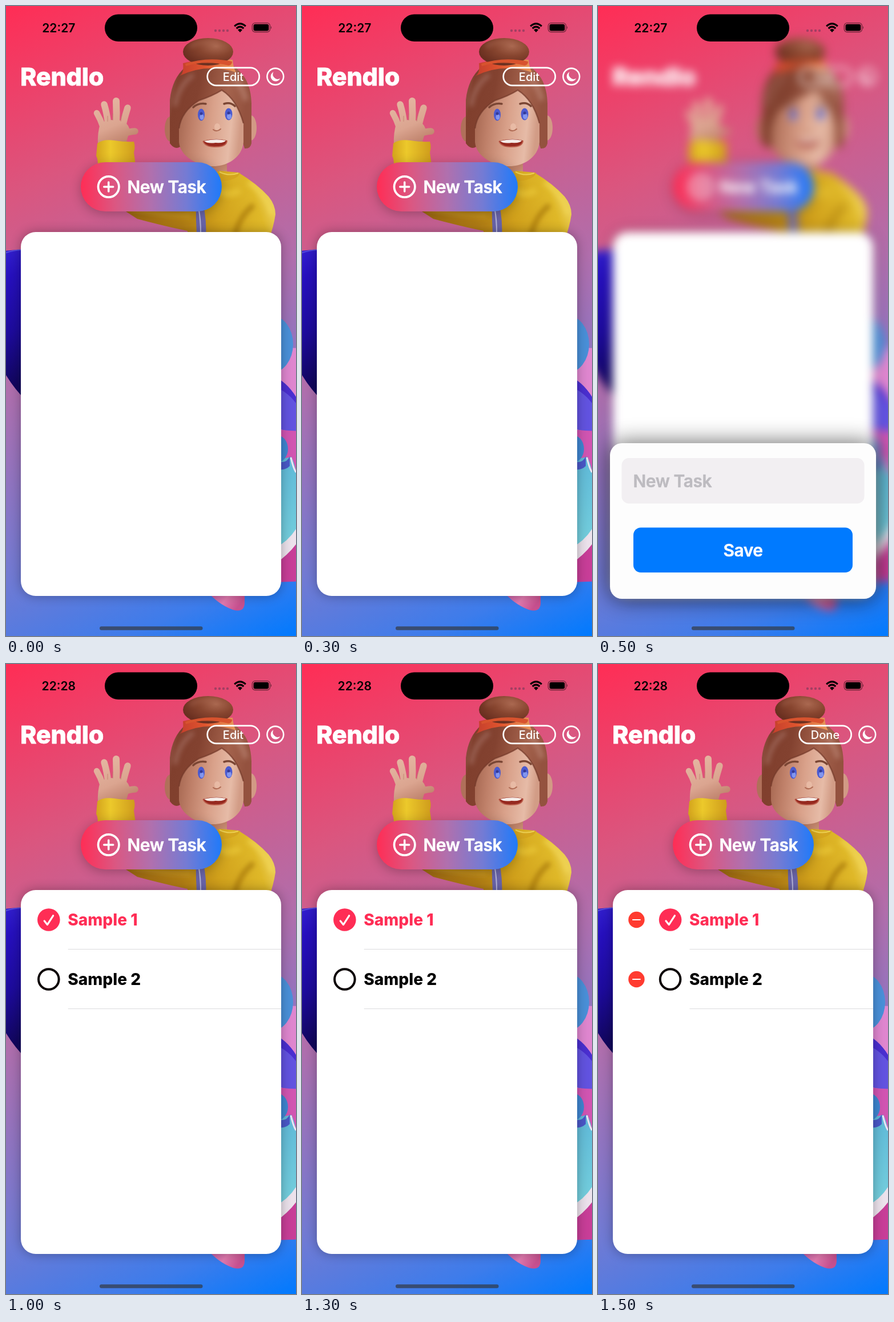
Write an HTML page that moves like this. It is 508 by 1101 pixels and loops after 2000 ms.

```html
<!DOCTYPE html>
<html lang="en">
<head>
<meta charset="utf-8">
<title>Task list</title>
<style>
html, body { margin: 0; width: 100%; height: 100%; overflow: hidden; background: #b06eac; }
svg { display: block; width: 100%; height: 100%; }
text { font-family: Inter, "Open Sans", sans-serif; font-weight: 600; stroke-linejoin: round; }
.white { fill: #fff; }
.line { fill: none; stroke: #fff; stroke-linecap: round; stroke-linejoin: round; }
.big { font-size: 30px; letter-spacing: -.45px; stroke-width: .5; }
.row { font-size: 28px; font-weight: 800; letter-spacing: .05px; }
.pill { font-size: 20px; font-weight: 500; text-anchor: middle; }
</style>
</head>
<body>
<svg viewBox="0 0 508 1101" preserveAspectRatio="none">
  <defs>
    <linearGradient id="sky" gradientUnits="userSpaceOnUse" x1="0" y1="0" x2="508" y2="1101">
      <stop offset="0" stop-color="#ff2d55"/><stop offset=".25" stop-color="#da567f"/>
      <stop offset=".5" stop-color="#b06eac"/><stop offset=".75" stop-color="#717ad3"/>
      <stop offset=".9" stop-color="#3d7ceb"/><stop offset="1" stop-color="#007aff"/>
    </linearGradient>
    <linearGradient id="button">
      <stop offset="0" stop-color="#ff2d55"/><stop offset=".25" stop-color="#da5883"/>
      <stop offset=".5" stop-color="#b070ae"/><stop offset=".75" stop-color="#747bd4"/>
      <stop offset="1" stop-color="#1f7afa"/>
    </linearGradient>
    <radialGradient id="bun" cx=".66" cy=".3" r=".7">
      <stop offset="0" stop-color="#a9674f"/><stop offset=".5" stop-color="#87452f"/><stop offset="1" stop-color="#6a2f20"/>
    </radialGradient>
    <linearGradient id="hair" x2="1" y2=".2">
      <stop offset="0" stop-color="#9c5f55"/><stop offset=".14" stop-color="#803f2d"/>
      <stop offset=".4" stop-color="#834230"/><stop offset=".75" stop-color="#a4634d"/><stop offset="1" stop-color="#94523f"/>
    </linearGradient>
    <linearGradient id="band">
      <stop offset="0" stop-color="#c43e2c"/><stop offset=".45" stop-color="#e0552e"/><stop offset="1" stop-color="#e79a5c"/>
    </linearGradient>
    <linearGradient id="skin" x2="1" y2=".12">
      <stop offset="0" stop-color="#a3644e"/><stop offset=".25" stop-color="#bf8069"/>
      <stop offset=".55" stop-color="#d9a18a"/><stop offset=".85" stop-color="#e6bba7"/><stop offset="1" stop-color="#d29c86"/>
    </linearGradient>
    <linearGradient id="palm" gradientUnits="userSpaceOnUse" x1="160" y1="165" x2="195" y2="245">
      <stop offset="0" stop-color="#e6b7a3"/><stop offset=".6" stop-color="#dba590"/><stop offset="1" stop-color="#bd806a"/>
    </linearGradient>
    <linearGradient id="neck" x2=".4" y2="1">
      <stop offset="0" stop-color="#9c5b45"/><stop offset="1" stop-color="#d39a80"/>
    </linearGradient>
    <linearGradient id="wool" gradientUnits="userSpaceOnUse" x1="220" y1="400" x2="462" y2="318">
      <stop offset="0" stop-color="#9a6512"/><stop offset=".35" stop-color="#b07c14"/>
      <stop offset=".6" stop-color="#d0a01b"/><stop offset=".88" stop-color="#dfb828"/><stop offset="1" stop-color="#ecd05a"/>
    </linearGradient>
    <linearGradient id="cuff">
      <stop offset="0" stop-color="#d3a31c"/><stop offset=".35" stop-color="#ecc92b"/><stop offset="1" stop-color="#cc981a"/>
    </linearGradient>
    <linearGradient id="ink" x2=".2" y2="1">
      <stop offset="0" stop-color="#3a2ad8"/><stop offset=".3" stop-color="#2610bd"/>
      <stop offset=".65" stop-color="#1d0b9b"/><stop offset="1" stop-color="#11065c"/>
    </linearGradient>
    <linearGradient id="foot" x2="1" y2=".4">
      <stop offset="0" stop-color="#b34f9b"/><stop offset=".6" stop-color="#e27bb0"/><stop offset="1" stop-color="#c7508f"/>
    </linearGradient>
    <linearGradient id="teal" x2="0" y2="1">
      <stop offset="0" stop-color="#5fb9d8"/><stop offset="1" stop-color="#78d2dd"/>
    </linearGradient>
    <filter id="haze" filterUnits="userSpaceOnUse" x="-60" y="-60" width="628" height="1221" color-interpolation-filters="sRGB">
      <feGaussianBlur stdDeviation="8"/>
    </filter>
    <filter id="soft" filterUnits="userSpaceOnUse" x="-60" y="200" width="628" height="900"><feGaussianBlur stdDeviation="10"/></filter>
    <filter id="deep" filterUnits="userSpaceOnUse" x="-80" y="660" width="668" height="500"><feGaussianBlur stdDeviation="20"/></filter>
    <filter id="smooth" filterUnits="userSpaceOnUse" x="150" y="40" width="358" height="380"><feGaussianBlur stdDeviation="4"/></filter>
    <clipPath id="body"><path d="M196 350L230 372Q282 386 318 393V410H460Q469 385 472 364Q472 348 460 333Q440 311 407 291L374 288Q349 298 332 330L280 345Z"/></clipPath>
  </defs>

  <rect width="508" height="1101" fill="url(#sky)"/>

  <g id="scene">
    <!-- shapes beside the card -->
    <path d="M-60 440Q-5 425 40 425V695Q15 670 0 645L-60 560Z" fill="url(#ink)"/>
    <path d="M-5 433Q10 427 26 426" fill="none" stroke="#7b7aec" stroke-width="2" opacity=".5"/>
    <path d="M470 600Q495 594 560 603V760H470Z" fill="#df86cf"/>
    <ellipse cx="463" cy="591" rx="40" ry="51" fill="#4a90d9"/>
    <path d="M465 645Q494 657 512 690L560 700V748Q500 748 465 735Z" fill="#6253e0"/>
    <path d="M465 645Q494 657 512 690V700Q494 672 465 664Z" fill="#4a2fd0"/>
    <path d="M465 738Q500 745 560 742V1004L465 1006Z" fill="#d155b2"/>
    <path d="M465 795L500 788Q506 800 508 815H560V900L470 970Z" fill="url(#teal)"/>
    <path d="M499 789Q503 807 508 815" fill="none" stroke="#eee4f3" stroke-width="3"/>
    <ellipse cx="472" cy="774" rx="22" ry="25" fill="#3f86d2"/>
    <path d="M480 797Q493 798 497 787V804Q490 811 480 810Z" fill="#4a58c8"/>
    <path d="M560 860L508 914Q494 936 470 948V982Q496 960 508 941L560 890Z" fill="#ece2ec"/>
    <path d="M470 976Q496 958 510 938L560 890V1004L470 1007Z" fill="#c83e98"/>
    <path d="M350 1020Q370 1045 397 1055Q417 1061 418 1044V1020Z" fill="url(#foot)"/>

    <!-- waving hand -->
    <g fill="none" stroke="url(#palm)" stroke-linecap="round">
      <path d="M170 212Q166 199 159 187" stroke-width="10.5"/>
      <path d="M179 208Q177 188 172 172" stroke-width="11.5"/>
      <path d="M193 207Q194 187 193 166" stroke-width="12"/>
      <path d="M204 211Q208 194 213 178" stroke-width="11.5"/>
      <path d="M207 223Q218 219 226 219" stroke-width="11.5"/>
    </g>
    <path d="M165 206Q180 195 205 201Q217 208 217 220Q213 228 210 242H161Q160 222 165 206Z" fill="url(#palm)"/>
    <path d="M178 202V192M187 200V188M201 202L203 190" fill="none" stroke="#b97965" stroke-width="1.5" opacity=".45"/>
    <path d="M160 240Q170 232 190 235T224 237Q227 246 224 256L230 300H160Q163 270 158 262Z" fill="url(#cuff)"/>

    <!-- jumper -->
    <path d="M347 262H387V302Q368 316 345 308Z" fill="url(#neck)"/>
    <path d="M196 350L230 372Q282 386 318 393V410H460Q469 385 472 364Q472 348 460 333Q440 311 407 291L374 288Q349 298 332 330L280 345Z" fill="url(#wool)"/>
    <g clip-path="url(#body)" fill="none" filter="url(#smooth)">
      <path d="M215 352Q270 366 325 366" stroke="#cf9d22" stroke-width="9" opacity=".7"/>
      <path d="M400 405Q408 367 434 348" stroke="#946208" stroke-width="9" opacity=".55"/>
      <path d="M372 322Q390 334 410 322" stroke="#edcd3c" stroke-width="12" opacity=".55"/>
      <path d="M425 308Q456 328 466 365" stroke="#f5dc5c" stroke-width="9" opacity=".6"/>
    </g>
    <path d="M374 288Q392 297 410 291Q408 301 388 305L364 308Z" fill="#d5a51e"/>
    <path d="M374 290Q390 298 407 292" fill="none" stroke="#ecd052" stroke-width="2"/>
    <path d="M333 345Q332 375 335 410H350Q352 372 345 345Z" fill="#6964a9"/>
    <path d="M338 357Q341 375 341 396" fill="none" stroke="#b6b4d8" stroke-width="2"/>

    <!-- head -->
    <ellipse cx="288" cy="215" rx="10" ry="22" fill="#b0705a"/>
    <ellipse cx="429" cy="213" rx="10" ry="22" fill="#d29a85"/>
    <path d="M287 240V164Q291 126 315 106Q336 94 360 95Q393 95 410 115Q429 134 430 170V240Q428 250 418 249L403 200H312L305 246Q296 252 287 240Z" fill="url(#hair)"/>
    <path d="M303 238V214Q307 184 338 165Q362 157 378 147Q405 164 416 205V238C414 263 390 280 363 280S305 263 303 238Z" fill="url(#skin)"/>
    <path d="M303 214Q307 184 338 165Q362 157 378 147Q405 164 416 205" fill="none" stroke="#74392a" stroke-width="2.5" opacity=".7"/>
    <g fill="none" filter="url(#smooth)">
      <path d="M296 175Q301 140 328 120" stroke="#b5857c" stroke-width="7" opacity=".5"/>
      <path d="M396 122Q414 138 420 165" stroke="#c08b7b" stroke-width="10" opacity=".55"/>
    </g>
    <path d="M310 100Q312 118 304 122Q352 99 403 116Q398 108 397 94Q352 89 310 100Z" fill="url(#band)"/>
    <ellipse cx="354" cy="80" rx="44" ry="24" fill="url(#bun)"/>
    <path d="M314 101Q352 88 396 97Q396 103 390 104Q350 94 315 105Z" fill="#d8532e"/>
    <path d="M322 71Q345 58 372 65" fill="none" stroke="#b97862" stroke-width="5" opacity=".5" filter="url(#smooth)"/>
    <g fill="none" stroke-linecap="round">
      <path d="M328 177Q337 169 350 171M382 171Q393 167 401 175" stroke="#7a4634" stroke-width="3.5"/>
      <path d="M363 216Q369 221 376 215" stroke="#b06c55" stroke-width="2"/>
    </g>
    <ellipse cx="370" cy="211" rx="5" ry="6" fill="#ecc2ad" opacity=".7"/>
    <g fill="#4a5ad0"><ellipse cx="342" cy="190" rx="6" ry="10.5"/><ellipse cx="390" cy="189" rx="6.5" ry="10.5"/></g>
    <g fill="#8296ee"><ellipse cx="343" cy="194" rx="3.5" ry="5"/><ellipse cx="391" cy="193" rx="4" ry="5"/></g>
    <g fill="#343a96"><circle cx="342" cy="188" r="2.5"/><circle cx="390" cy="187" r="2.5"/></g>
    <path d="M345 236Q367 230 387 235Q388 246 368 246Q349 247 345 236Z" fill="#96291f"/>
    <path d="M347 236Q367 231 385 235Q383 240 367 239Q353 241 347 236Z" fill="#f5ece8"/>
    <path d="M345 236Q349 247 368 246Q387 246 387 235" fill="none" stroke="#bc5d4b" stroke-width="1.8"/>

    <!-- header -->
    <text class="white" x="25" y="139" font-size="43" style="font-weight:800;letter-spacing:-.2px" stroke="#fff" stroke-width=".8">Rendlo</text>
    <rect class="line" x="352.7" y="107.8" width="91" height="31" rx="15.5" stroke-width="2.7"/>
    <text id="mode" class="pill white" x="398" y="130.8">Edit</text>
    <circle class="line" cx="471.8" cy="123.3" r="14.4" stroke-width="2.6"/>
    <path class="white" d="M468.5 115.3A8.6 8.6 0 1 0 480.2 126.5A8.4 8.4 0 0 1 468.5 115.3Z"/>

    <rect x="131" y="277" width="247" height="86" rx="43" opacity=".25" filter="url(#soft)"/>
    <rect x="131" y="273" width="247" height="86" rx="43" fill="url(#button)"/>
    <circle class="line" cx="179.7" cy="316" r="18.2" stroke-width="3.7"/>
    <path class="line" d="M171.7 316H187.7M179.7 308V324" stroke-width="3.5"/>
    <text class="big white" x="212.5" y="327.3" stroke="#fff">New Task</text>

    <rect x="26" y="395" width="456" height="636" rx="26" opacity=".3" filter="url(#soft)"/>
    <rect x="26" y="395" width="456" height="636" rx="26" fill="#fff"/>
    <g id="list">
      <path id="rules" fill="none" stroke="#dcdcde"/>
      <g id="rows">
        <circle cx="74.8" cy="447" r="19.8" fill="#ff2d55"/>
        <path class="line" d="M67.2 449L72.4 455.6L82.6 439.8" stroke-width="3.2"/>
        <text class="row" x="108.2" y="457" fill="#ff2d55">Sample 1</text>
        <circle cx="74.8" cy="551" r="17.8" fill="none" stroke="#0b0304" stroke-width="4"/>
        <text class="row" x="108.2" y="561" fill="#000">Sample 2</text>
      </g>
      <g id="remove">
        <g fill="#ff3b30"><circle cx="67.4" cy="447" r="14.2"/><circle cx="67.4" cy="551" r="14.2"/></g>
        <path class="line" d="M61 447H73.8M61 551H73.8" stroke-width="2.2"/>
      </g>
    </g>
  </g>

  <g id="sheet">
    <rect x="21" y="764" width="466" height="272" rx="21" opacity=".62" filter="url(#deep)"/>
    <rect x="21" y="764" width="466" height="272" rx="21" fill="#fdfdfd"/>
    <rect x="41.5" y="790" width="425" height="79.5" rx="12.5" fill="#f2eff2"/>
    <text class="big" x="61.5" y="841" fill="#bdbbc0" stroke="#bdbbc0">New Task</text>
    <rect x="62" y="911.5" width="384" height="78.5" rx="13" fill="#007aff"/>
    <text class="big white" x="254" y="962" text-anchor="middle" stroke="#fff">Save</text>
  </g>

  <!-- status bar -->
  <text id="clock" x="92.3" y="45.5" font-size="21" text-anchor="middle">22:27</text>
  <rect x="173" y="14.5" width="162" height="47.5" rx="23.7"/>
  <g fill="#803a5c" opacity=".65">
    <circle cx="367" cy="43" r="2.2"/><circle cx="374" cy="43" r="2.2"/><circle cx="381" cy="43" r="2.2"/><circle cx="388" cy="43" r="2.2"/>
  </g>
  <path d="M400.2 35.4Q410 26.4 419.8 35.4M403.7 39.2Q410 33.4 416.3 39.2" fill="none" stroke="#000" stroke-width="3.2"/>
  <path d="M406 41.8Q410 38.4 414 41.8L410 46Z"/>
  <rect x="431.3" y="29.7" width="31.2" height="15.8" rx="5" fill="none" stroke="#000" stroke-opacity=".5" stroke-width="1.3"/>
  <rect x="433.5" y="31.8" width="26.8" height="11.6" rx="3.2"/>
  <path d="M464 35Q466.4 37.6 464 40.2Z" opacity=".5"/>
  <rect x="164" y="1084.3" width="180.5" height="6.4" rx="3.2" fill="#333" opacity=".65"/>
</svg>
<script>
const $ = id => document.getElementById(id);
const show = (id, on) => $(id).setAttribute("display", on ? "inline" : "none");
const HOLD = 500;
const states = [
  { clock: "22:27" },
  { clock: "22:27", sheet: true },
  { clock: "22:28", list: true },
  { clock: "22:28", list: true, editing: true }
];
let current;

function update(ms) {
  const state = states[Math.floor(ms / HOLD) % states.length];
  if (state === current) return;
  current = state;
  const shift = state.editing ? 51.8 : 0;
  $("clock").textContent = state.clock;
  $("mode").textContent = state.editing ? "Done" : "Edit";
  $("scene").setAttribute("filter", state.sheet ? "url(#haze)" : "none");
  $("rows").setAttribute("transform", `translate(${shift} 0)`);
  $("rules").setAttribute("d", [498.5, 602.5].map(y => `M${108.7 + shift} ${y}H482`).join(""));
  show("sheet", state.sheet);
  show("list", state.list);
  show("remove", state.editing);
}

const start = performance.now();
function tick() {
  update(performance.now() - start);
  requestAnimationFrame(tick);
}
tick();
</script>
</body>
</html>
```
